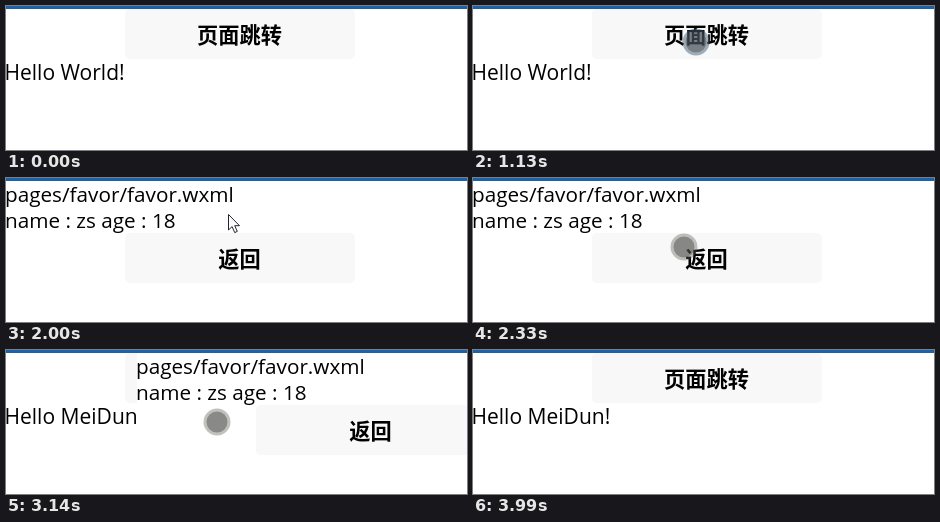
Recreate the animation shown at these times as an HTML page. Size 461x144 px, loop 5.79 s.

```html
<!DOCTYPE html>
<html lang="zh-CN">
<head>
<meta charset="utf-8">
<title>Page navigation</title>
<style>
  html, body { margin: 0; width: 100%; height: 100%; overflow: hidden; background: #fff; }
  svg { display: block; width: 461px; height: 144px; }
  text { font: 20.7px "Open Sans", "Noto Sans", sans-serif; fill: #000; }
  .hello { font-size: 21px; }
  .label { font: bold 21.2px "Noto Sans CJK SC", "Noto Sans CJK", sans-serif; text-anchor: middle; }
  .btn { fill: #f8f8f8; }

  .page, .before, .after, .cursor, .arrow, .ring, .core { animation: 5790ms step-end infinite; }
  .page { animation-name: slide; }
  .before { animation-name: before; }
  .after { animation-name: after; }
  .cursor { animation-name: move; }
  .arrow { animation-name: arrow; }
  .ring { animation-name: ring; }
  .core { animation-name: core; }

  @keyframes slide {
    0% { transform: translateX(461px); }
    22.97% { transform: translateX(437px); }
    24.18% { transform: translateX(120px); }
    25.39% { transform: translateX(0); }
    52.84% { transform: translateX(12px); }
    54.22% { transform: translateX(131px); }
    55.09% { transform: translateX(340px); }
    56.47% { transform: translateX(446px); }
    57.51%, 100% { transform: translateX(461px); }
  }
  @keyframes before { 0% { opacity: 1; } 34.54%, 100% { opacity: 0; } }
  @keyframes after { 0% { opacity: 0; } 34.54%, 100% { opacity: 1; } }
  @keyframes arrow { 0% { opacity: 0; } 34.54% { opacity: 1; } 35.57%, 100% { opacity: 0; } }
  @keyframes move {
    0% { transform: translate(-40px, -40px); }
    3.45% { transform: translate(377px, 138px); }
    4.66% { transform: translate(364px, 77px); }
    5.69% { transform: translate(315px, 40px); }
    6.9% { transform: translate(265px, 24px); }
    8.11% { transform: translate(238px, 21px); }
    9.15% { transform: translate(226px, 30px); }
    10.36% { transform: translate(223px, 36px); }
    34.54% { transform: translate(-40px, -40px); }
    35.57% { transform: translate(222px, 40px); }
    36.78% { transform: translate(220px, 47px); }
    37.99% { transform: translate(216px, 56px); }
    39.2% { transform: translate(213px, 64px); }
    40.24% { transform: translate(211px, 69px); }
    41.45% { transform: translate(211px, 72px); }
    64.24% { transform: translate(218px, 74px); }
    65.45% { transform: translate(245px, 83px); }
    66.66% { transform: translate(290px, 96px); }
    67.7% { transform: translate(377px, 138px); }
    68.91%, 100% { transform: translate(-40px, -40px); }
  }
  /* hover, press, release */
  @keyframes ring {
    0% { fill: rgba(40, 40, 40, .48); }
    16.06% { fill: rgba(225, 220, 20, .75); }
    19.51% { fill: rgba(70, 95, 120, .5); }
    34.54% { fill: rgba(90, 95, 85, .38); }
    51.81% { fill: rgba(225, 220, 20, .75); }
    52.84%, 100% { fill: rgba(90, 95, 85, .38); }
  }
  @keyframes core {
    0% { fill: rgba(70, 70, 70, .45); }
    16.06% { fill: rgba(170, 160, 20, .45); }
    19.51% { fill: rgba(70, 70, 70, .45); }
    51.81% { fill: rgba(170, 160, 20, .45); }
    52.84%, 100% { fill: rgba(70, 70, 70, .45); }
  }
</style>
</head>
<body>
<svg viewBox="0 0 461 144">
  <rect width="461" height="144" fill="#fff"/>
  <rect class="btn" x="119" y="3" width="230" height="50" rx="5"/>
  <text class="label" x="233.5" y="37">页面跳转</text>
  <text class="hello before" x="-1.5" y="74">Hello World!</text>
  <text class="hello after" x="-1.5" y="74">Hello MeiDun!</text>

  <g class="page">
    <rect y="3" width="461" height="141" fill="#fff"/>
    <text x="-1" y="24">pages/favor/favor.wxml</text>
    <text x="-1" y="50">name : zs age : 18</text>
    <rect class="btn" x="119" y="55" width="230" height="50" rx="5"/>
    <text class="label" x="233.5" y="89">返回</text>
  </g>

  <rect width="461" height="3" fill="#1a62a9"/>
  <g class="cursor">
    <circle class="ring" r="13.5"/>
    <circle class="core" r="10.5"/>
  </g>
  <path class="arrow" d="M222.5 36.5v15.5l3.6-3.4 2.6 6 2.6-1.2-2.6-5.7h4.8z"
        fill="#fff" stroke="#223" stroke-width="1"/>
</svg>
</body>
</html>
```
